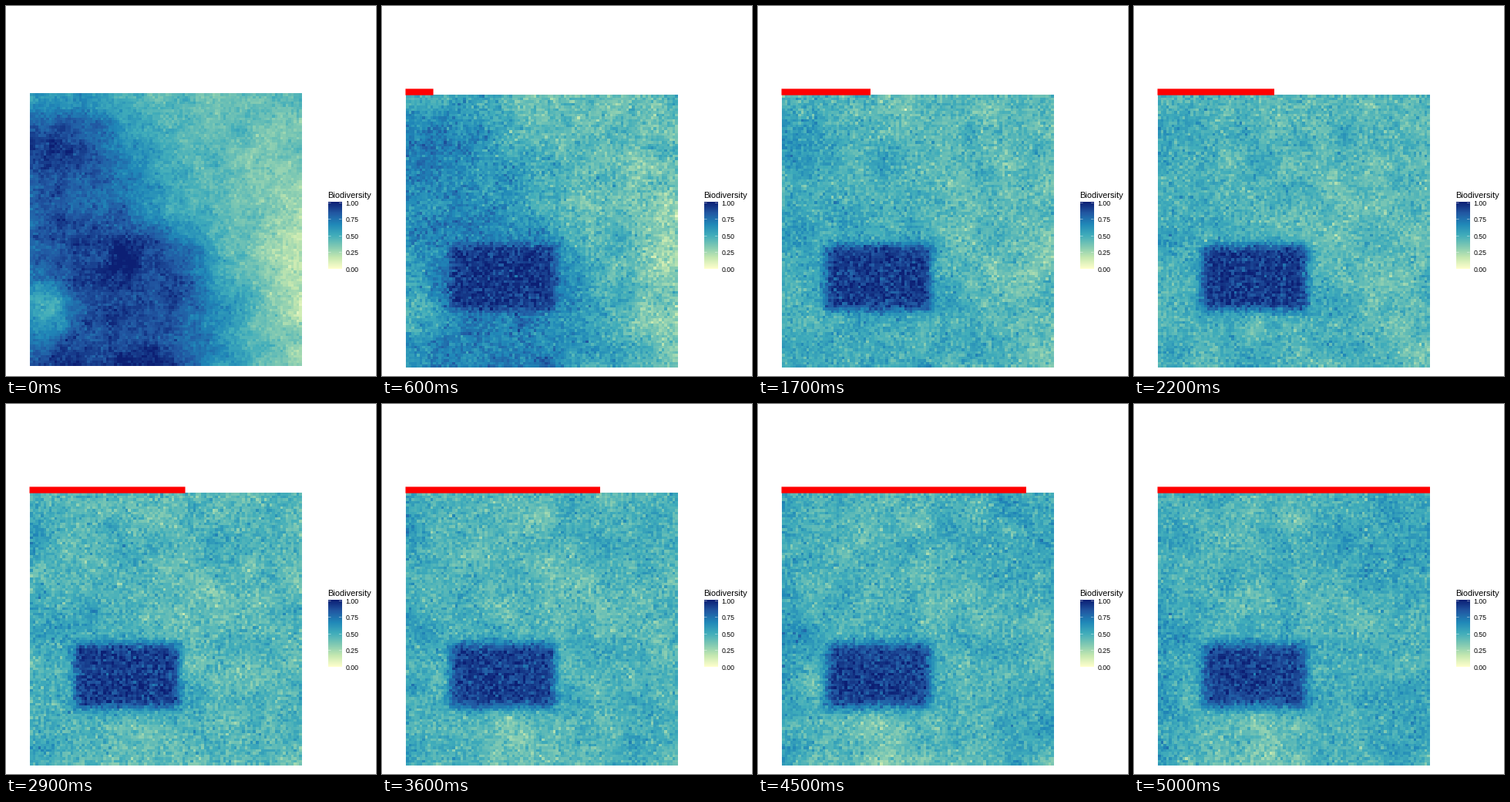
Recreate the animation shown at these times as a matplotlib script. Size 480 px wide and 480 px high, loop 5100 ms.

```python
import numpy as np
import matplotlib.pyplot as plt
from matplotlib.animation import FuncAnimation
from matplotlib.colors import LinearSegmentedColormap
from matplotlib.patches import Rectangle

SIZE, CELLS, FRAMES, STEP_MS = 480, 100, 51, 100
LEFT, RIGHT, SIDE = 31, 384, 354
REST = 0.425  # level the unprotected land settles at

plt.rcParams["font.family"] = "Liberation Sans"
cmap = LinearSegmentedColormap.from_list("biodiversity", [
    "#ffffcc", "#c5e8b0", "#80c9b3", "#41adbb", "#2088b8", "#2259a3", "#0c1f74"])

rng = np.random.default_rng(12)
cells = np.arange(CELLS)
X, Y = np.meshgrid(cells / (CELLS - 1), cells / (CELLS - 1))


def blur(field, sigma):
    kernel = np.exp(-(cells[:, None] - cells) ** 2 / (2 * sigma ** 2))
    kernel /= kernel.sum(axis=1, keepdims=True)
    return kernel @ field @ kernel.T


def white():
    return rng.standard_normal((CELLS, CELLS))


def patches(sigma):
    """Smooth random field with unit spread."""
    field = blur(white(), sigma)
    return (field - field.mean()) / field.std()


def bump(x, y, rx, ry, height):
    return height * np.exp(-((X - x) / rx) ** 2 - ((Y - y) / ry) ** 2)


def rich_land():
    """Dark west and pale east, split by an S-shaped border."""
    border = 0.53 + 0.16 * np.tanh((Y - 0.52) / 0.12)
    land = 0.63 - 0.23 * np.tanh((X - border) / 0.2)
    land += bump(0.05, 0, 0.35, 0.1, -0.28)
    land += bump(0.12, 0.23, 0.2, 0.12, 0.08)
    land += bump(0.38, 0.66, 0.25, 0.16, 0.14)
    land += bump(0.05, 0.79, 0.14, 0.14, -0.36)
    land += bump(0.42, 1, 0.25, 0.08, 0.14)
    land += bump(1, 0.68, 0.16, 0.33, -0.22)
    return land + 0.03 * patches(3.5) + 0.025 * patches(1.3)


def late_change():
    """Slow recovery toward the edges, loss around the reserve."""
    change = bump(1, 0.12, 0.45, 0.25, 0.12)
    change += bump(1, 0.8, 0.3, 0.35, 0.11)
    change += bump(0, 0.65, 0.14, 0.45, 0.1)
    change += bump(0.4, 0.92, 0.25, 0.15, -0.08)
    return change + 0.04 * np.exp(-(X / 0.9) ** 2) - 0.09 * blur(reserve, 5)


reserve = np.zeros((CELLS, CELLS))
reserve[55:79, 16:55] = 1


def simulate():
    start, change = rich_land(), late_change()
    fields = [start + 0.035 * white()]
    drift = patches(3)
    for n in range(1, FRAMES):
        t = n / (FRAMES - 1)
        drift = 0.93 * drift + 0.37 * patches(3)
        land = REST + (start - REST) * np.exp(-n / 11)
        land += t ** 2.5 * change + 0.032 * drift
        inside = blur(reserve, 1.3 + 0.8 * t)
        core = 0.93 - 0.03 * t
        fields.append(land + inside * (core - land) + 0.062 * white())
    return np.clip(fields, 0, 1)


fields = simulate()

fig = plt.figure(figsize=(SIZE / 100, SIZE / 100), dpi=100, facecolor="white")
ax = fig.add_axes([0, 0, 1, 1])
ax.axis("off")


def picture(data, extent):
    return ax.imshow(data, cmap=cmap, vmin=0, vmax=1, aspect="auto",
                     extent=extent, interpolation="nearest")


land_img = picture(fields[0], (LEFT, RIGHT, 113 + SIDE, 113))
bar = ax.add_patch(Rectangle((30.5, 107.4), 0, 8.3, color="red", lw=0,
                             zorder=3, snap=False))

# Legend
picture(np.linspace(1, 0, 300)[:, None], (418, 435.5, 341.5, 255))
ax.text(417.4, 249, "Biodiversity", fontsize=11 * 0.72, va="baseline")
for level in np.linspace(0, 1, 5):
    y = 341.3 - 86 * level
    for x in (418, 432):
        ax.plot([x, x + 3.5], [y, y], color="white", lw=0.3,
                solid_capstyle="butt", snap=False)
    ax.text(440.5, y + 3.6, f"{level:.2f}", fontsize=8.8 * 0.72, va="baseline")

ax.set_xlim(0, SIZE)
ax.set_ylim(SIZE, 0)


def draw(n):
    land_img.set_data(fields[n])
    top = 115 if n else 113
    land_img.set_extent((LEFT, RIGHT, top + SIDE, top))
    ax.set_xlim(0, SIZE)
    ax.set_ylim(SIZE, 0)
    bar.set_width(max(n - 1, 0) * 353.5 / (FRAMES - 2))
    return land_img, bar


anim = FuncAnimation(fig, draw, frames=FRAMES, interval=STEP_MS,
                     repeat=True, repeat_delay=0)
plt.show()
```
